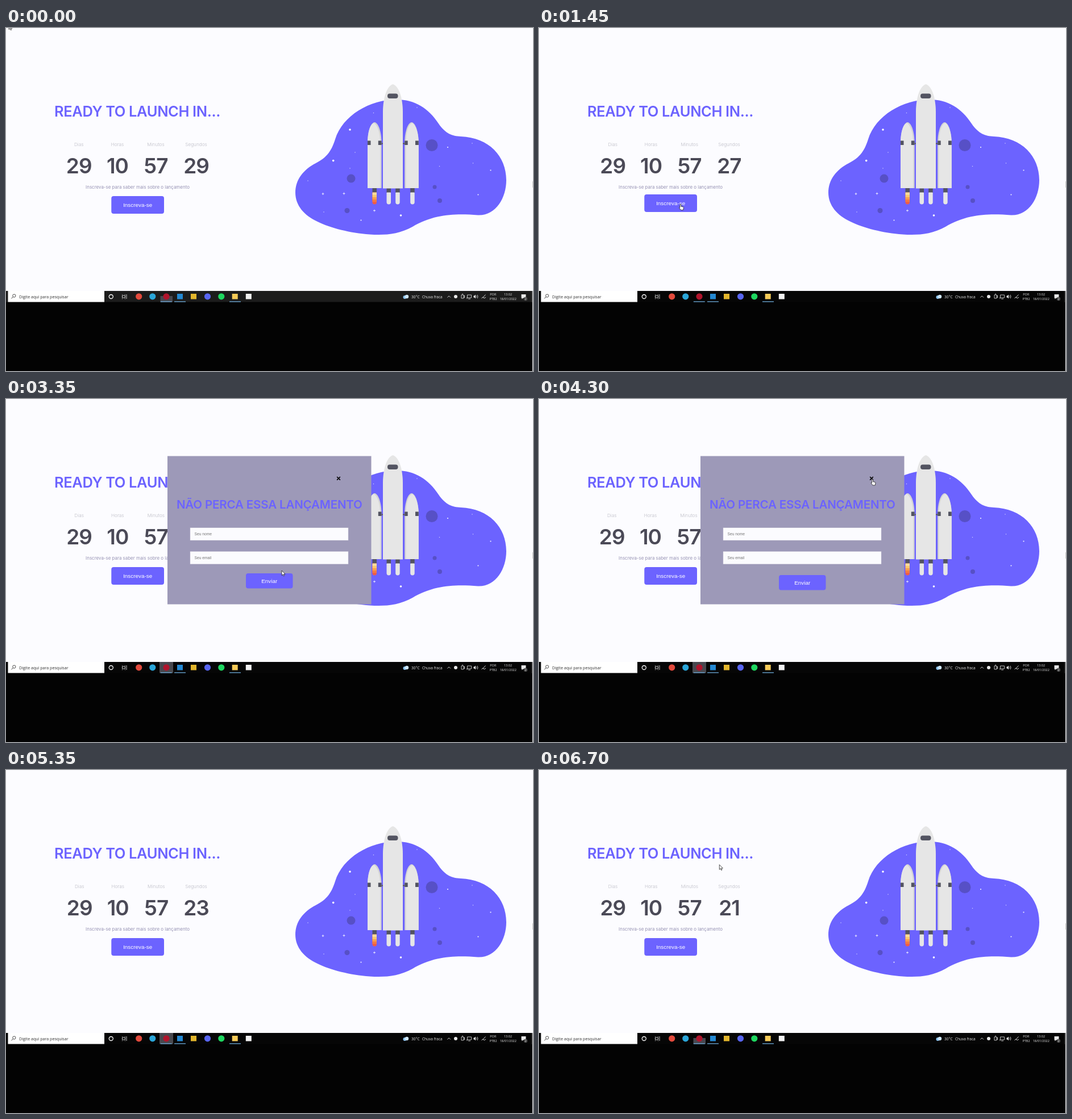
An HTML page with a canvas for the animation above (6900 ms loop, 927 by 604 pixels).

```html
<!DOCTYPE html>
<html lang="pt-BR">
<head>
<meta charset="utf-8">
<title>Ready to launch</title>
<style>
html, body { margin: 0; width: 100%; height: 100%; overflow: hidden; background: #000; }
canvas { display: block; }
</style>
</head>
<body>
<canvas id="stage" width="927" height="604"></canvas>
<script>
const ctx = document.getElementById('stage').getContext('2d');
const LOOP = 6900, STEP = 50;
const PURPLE = '#6c63ff', DARK = '#535461', PALE = '#e6e6e6';
const BODY = 'Inter, sans-serif', BAR = '"Open Sans", sans-serif';
const FORM = '"Liberation Sans", Arial, sans-serif';

// Countdown ticks, and how far the row shifts for each value from 29 down
const TICKS = [200, 1100, 1950, 2800, 3700, 4700, 5550, 6450];
const SHIFT = [0, 0, 1.5, 0, 0.4, 0, 1, 1, 1.7];

// Pointer path: time, x, y
const PATH = [
  [950, 214, 293], [1100, 236, 304], [1400, 248, 310], [1800, 248, 310],
  [2150, 366.5, 324], [2450, 440, 325], [3000, 470, 318], [3300, 482, 312],
  [3350, 485, 302], [3550, 514, 224], [3800, 578, 156], [4000, 583, 150],
  [4350, 586, 140]
];

const within = (t, a, b) => t >= a && t < b;
const clamp = v => Math.max(0, Math.min(1, v));
const ease = v => v * v * (3 - 2 * v);
const lift = (t, on, off) => 3 * (ease(clamp((t - on) / 250)) - ease(clamp((t - off) / 250)));

function rect(x, y, w, h, color) {
  ctx.fillStyle = color;
  ctx.fillRect(x, y, w, h);
}

function round(x, y, w, h, r, color) {
  ctx.fillStyle = color;
  ctx.beginPath();
  ctx.roundRect(x, y, w, h, r);
  ctx.fill();
}

function dot(x, y, r, color) {
  ctx.fillStyle = color;
  ctx.beginPath();
  ctx.arc(x, y, r, 0, Math.PI * 2);
  ctx.fill();
}

function ring(x, y, r, color, width) {
  ctx.strokeStyle = color;
  ctx.lineWidth = width;
  ctx.beginPath();
  ctx.arc(x, y, r, 0, Math.PI * 2);
  ctx.stroke();
}

function shape(d, fill, stroke, width = 1) {
  const p = new Path2D(d);
  if (fill) { ctx.fillStyle = fill; ctx.fill(p); }
  if (stroke) { ctx.strokeStyle = stroke; ctx.lineWidth = width; ctx.stroke(p); }
}

function text(s, x, y, font, color, align = 'center', gap = 0) {
  ctx.font = font;
  ctx.fillStyle = color;
  ctx.textAlign = align;
  ctx.letterSpacing = gap + 'px';
  ctx.fillText(s, x, y);
}

function button(label, x, y, w, h) {
  round(x, y, w, h, 4, PURPLE);
  text(label, x + w / 2, y + h / 2 + 3.5, '9.9px ' + FORM, '#fff');
}

function countdown(t) {
  const n = TICKS.filter(k => t >= k).length, s = SHIFT[n];
  const cols = [
    ['Dias', 29, 128.2 + s], ['Horas', 10, 196 + s * 0.7],
    ['Minutos', 57, 263.5 + s * 0.8], ['Segundos', 29 - n, 334.5]
  ];
  for (const [label, value, x] of cols) {
    text(label, x, 208, '300 8.2px ' + BODY, '#bdbdc6');
    text(value, x, 255.8, '600 37px ' + BODY, '#4b4a57', 'center', -1);
  }
}

function space() {
  shape('M509 290C509 268 522 250 545 238C565 228 573 215 579 196C592 154 640 126 687 126' +
    'C719 126 743 141 761 168.5C773 186 785 190.5 800 191C850 193 880 226 880 268' +
    'C880 300 861 331 830 329.5C795 327 755 326 715 350C690 364 665 365 640 363.5' +
    'C605 361 570 352 548 341C524 330 509 312 509 290Z', PURPLE);
  const craters = [[749, 206.5, 10.5], [607, 265, 7.5], [600, 321.5, 4.5], [754, 280, 3.5], [763, 304, 4]];
  for (const [x, y, r] of craters) dot(x, y, r, '#5750c6');
  const big = [[605, 179], [575.7, 233.6], [694.5, 330]];
  const mid = [[777, 210], [830.5, 293.5], [852.5, 250.5], [624.5, 338.5]];
  const small = [[821.5, 238], [614, 219], [605, 247], [646.5, 149.5], [531, 269],
    [559, 324], [762.5, 243.5], [723, 140], [820, 203]];
  big.forEach(p => dot(...p, 1.8, '#fff'));
  mid.forEach(p => dot(...p, 1.1, '#f0efff'));
  small.forEach(p => dot(...p, 0.7, '#dad8ff'));
  for (const [x, y] of [[557.5, 292], [594.5, 291.5], [648, 321.5]])
    shape(`M${x - 2} ${y}h4M${x} ${y - 2}v4`, null, '#f0efff', 0.9);
}

function engine(x, lit) {
  rect(x, 282, 7.5, 8, DARK);
  round(x, 289.5, 7.5, 21, [1, 1, 3.7, 3.7], lit ? '#ef5d47' : PALE);
  if (!lit) return;
  rect(x, 289.5, 7.5, 4.5, '#f9dc9c');
  rect(x, 294, 7.5, 4, '#fbc86e');
  rect(x, 298, 7.5, 4, '#f9a04e');
  rect(x, 302, 7.5, 4, '#f47b42');
}

function booster(x, lit, shade) {
  shape(`M${x} 282V203C${x} 184 ${x + 5} 167 ${x + 12.3} 166` +
    `C${x + 19.6} 167 ${x + 24.6} 184 ${x + 24.6} 203V282Z`, '#d3d3d5');
  const a = x + shade;
  shape(`M${a} 282V203C${a} 185 ${a + 4} 169 ${a + 11} 167.5` +
    `C${a + 17.5} 170 ${a + 22.3} 186 ${a + 22.3} 203V282Z`, PALE);
  rect(x, 198.5, 5.5, 7.5, DARK);
  rect(x + 18.8, 198.5, 5.8, 7.5, DARK);
  engine(x + 8.5 + (lit ? 0 : 1.5), lit);
}

function rocket() {
  rect(659, 202.5, 5, 2, DARK);
  rect(697, 202.5, 5, 2, DARK);
  engine(669.5);
  engine(685.2);
  booster(636, true, 0);
  booster(701.2, false, 2.3);
  shape('M663 282.5V148C663 123 670 102 680.5 99C691 102 698 123 698 148V282.5Z', PALE);
  round(671, 115.5, 18.5, 8.5, 4, DARK);
}

function modal(t) {
  rect(284, 100.5, 358.5, 261, '#9d99b8');
  shape('M582.2 137l5.6 5.6M587.8 137l-5.6 5.6', null, '#000', 1.7);
  text('NÃO PERCA ESSA LANÇAMENTO', 463.3, 193.3, '600 20.6px ' + BODY, PURPLE, 'center', -0.2);
  [['Seu nome', 226.5], ['Seu email', 268.3]].forEach(([label, y]) => {
    rect(323.7, y, 278.6, 22.6, '#c9c7d6');
    rect(324.2, y + 0.5, 277.6, 21.6, '#fbfbfe');
    text(label, 331.5, y + 13.7, '6.7px ' + FORM, '#757575', 'left');
  });
  button('Enviar', 422, 310 - lift(t, 2400, 3450), 82.5, 26.6);
}

function tray() {
  const white = '#e8e8e8';
  dot(701.5, 474, 3, '#8fc7f5');
  dot(705, 473, 3.2, '#cfe6fa');
  text('30°C', 713, 475.5, '6.7px ' + BAR, white, 'left');
  text('Chuva fraca', 732, 475.5, '6.5px ' + BAR, white, 'left');
  shape('M776.5 474.5l2.7-2.7l2.7 2.7', null, white, 0.9);
  dot(791, 473, 3, white);
  shape('M801 470h4v6h-4zM805 472l1.5-1v4l-1.5-1M802 468.5h2', null, white, 0.8);
  shape('M811.5 470h7v5h-7zM813 477h4M811 474v3', null, white, 0.8);
  shape('M822.5 471.5h1.5l2-2v7l-2-2h-1.5z', white);
  shape('M827.5 471q1.4 2 0 4M829 469.7q2.4 3.3 0 6.6', null, white, 0.7);
  shape('M836.5 476q2-3 3.5-1t4-1M838.5 475l5-5.5', null, white, 0.9);
  text('POR', 856.8, 470.5, '5.5px ' + BAR, white);
  text('PTB2', 857, 479, '5.5px ' + BAR, white);
  text('13:02', 883, 470.5, '5.5px ' + BAR, white);
  text('18/01/2022', 883.3, 479, '5.5px ' + BAR, white);
  shape('M906.5 469h8v6.5h-5l-2 2v-2h-1z', white);
  dot(914, 477, 3.3, '#444');
  text('2', 914, 479, '5px ' + BAR, white);
  rect(924, 463, 0.7, 20, '#555');
}

function taskbar(t) {
  rect(0, 463, 926, 141, '#030303');
  rect(0, 463, 926, 19.5, t < 500 ? '#1c1c1c' : '#060606');
  rect(3.5, 463, 169.5, 19.5, '#fff');
  ring(14.3, 471.5, 2.6, '#333', 0.9);
  shape('M12.4 473.4l-2.9 3', null, '#333');
  text('Digite aqui para pesquisar', 23, 475.7, '7.1px ' + BAR, '#333', 'left');
  ring(184.8, 473, 3.5, '#fff', 1.3);
  shape('M204.5 471h5v4h-5zM204.5 469v.8M209.5 469v.8M204.5 476.3v1M209.5 476.3v1M212 469v8', null, '#ddd', 0.9);

  if (t < 350 || t >= 6700) rect(271.5, 472, 21.5, 10.5, '#484850');
  else if (t >= 1650) rect(270, 463, 24, 19.5, '#48484e');
  [271.8, 296, 393].forEach(x => rect(x, 481.3, 20, 1.2, '#76b9ed'));

  const apps = [[233.7, '#e34a3c'], [257.8, '#2aa5d8'], [282, '#b0142c'], [354.5, '#5865f2'], [378.8, '#1ed760']];
  apps.forEach(([x, c]) => dot(x, 472.8, 5.6, c));
  const tiles = [[306, '#2489d3'], [330, '#e3b62c'], [402.7, '#f6cb58'], [426.8, '#f1f1f1']];
  tiles.forEach(([x, c]) => rect(x - 5, 468, 10, 9.5, c));
  tray();
}

function arrow(x, y) {
  shape(`M${x} ${y}v8.6l2-1.8l1.3 3l1.4-.6l-1.3-2.9h2.7z`, '#fff', '#222', 0.8);
}

function hand(x, y) {
  shape(`M${x} ${y + 1}q1-1.8 2 0v3.2l3.6.8q.9.3.8 1.6l-.7 3.9h-4.2l-3-4q.3-1.3 1.5-.3z`, '#fff', '#222', 0.8);
}

function pointer(t) {
  if (t < 100) return arrow(5, -6);
  if (within(t, 700, 800)) return arrow(179.5, 189.5);
  if (t >= 6450) return arrow(317.3, t < 6700 ? 164 : 166.7);
  if (!within(t, 950, 5050)) return;
  const i = PATH.findIndex(p => p[0] > t);
  let [, x, y] = PATH[PATH.length - 1];
  if (i > 0) {
    const a = PATH[i - 1], b = PATH[i], k = (t - a[0]) / (b[0] - a[0]);
    x = a[1] + (b[1] - a[1]) * k;
    y = a[2] + (b[2] - a[2]) * k;
  }
  const link = within(t, 1100, 1900) || within(t, 2400, 3300) || within(t, 4000, 4600);
  (link ? hand : arrow)(x, y);
}

function draw(t) {
  rect(0, 0, 927, 604, '#fcfcff');
  rect(926, 270, 1, 11, '#ccc');
  text('READY TO LAUNCH IN...', 85, 156, '600 25.5px ' + BODY, PURPLE, 'left', -0.4);
  countdown(t);
  text('Inscreva-se para saber mais sobre o lançamento', 231.5, 283.4, '7.95px ' + BODY, '#9793b4');
  button('Inscreva-se', 185.3, 296 - lift(t, 1100, 1900), 92.7, 31);
  space();
  rocket();
  if (within(t, 1650, 4600)) modal(t);
  taskbar(t);
  pointer(t);
}

const start = performance.now();
function tick() {
  const t = (performance.now() - start) % LOOP;
  draw(t - t % STEP);
  requestAnimationFrame(tick);
}
tick();
</script>
</body>
</html>
```
